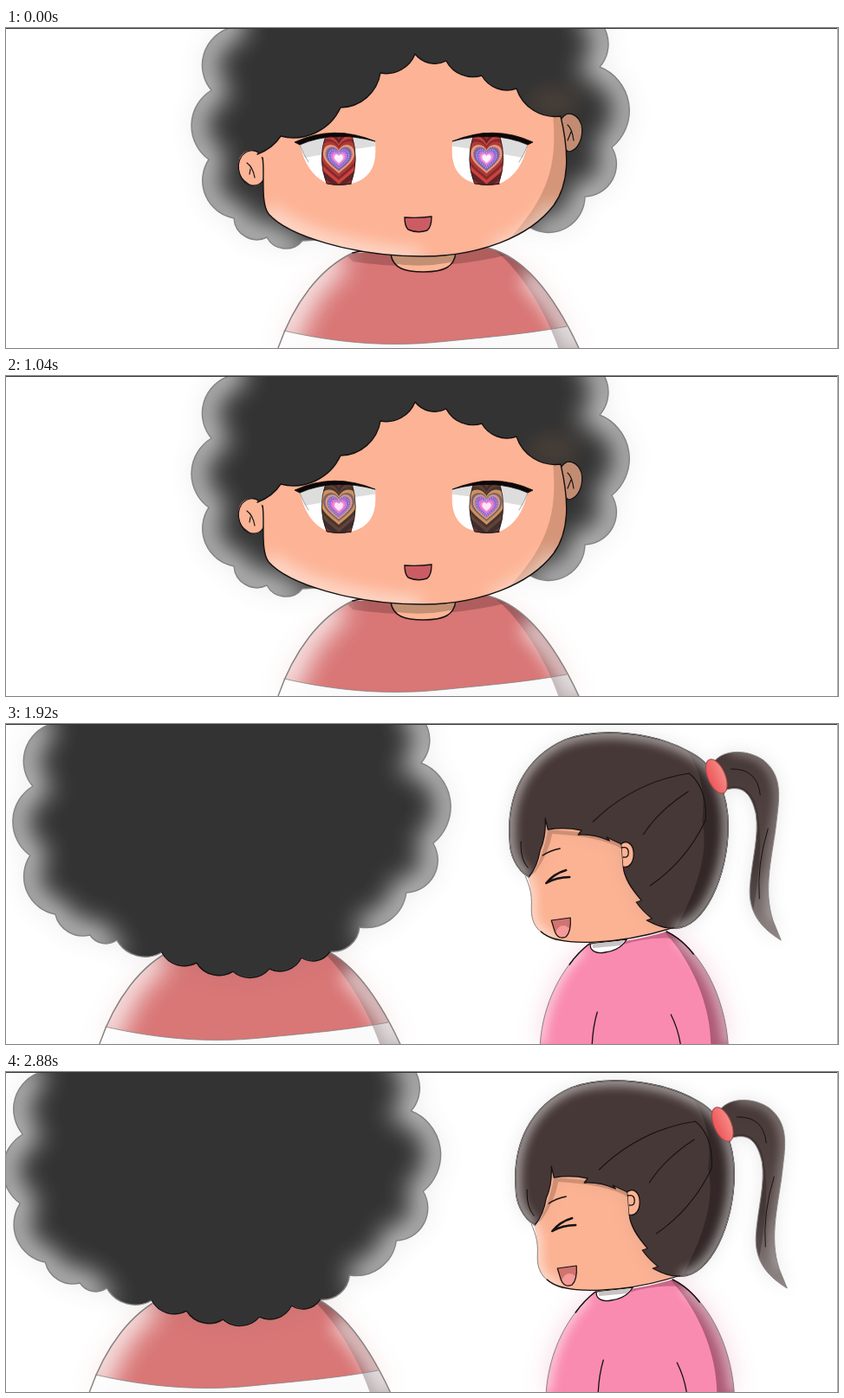
An HTML page for the animation above (2960 ms loop, 960 px wide and 370 px high).

```html
<!DOCTYPE html>
<html lang="en">
<head>
<meta charset="utf-8">
<title>Heart eyes</title>
<style>
html, body { margin: 0; width: 100%; height: 100%; overflow: hidden; background: #fff; }
svg { display: block; width: 100vw; height: 100vh; }
.line { fill: none; stroke: #161212; stroke-width: 1.5; stroke-linecap: round; stroke-linejoin: round; }
.grey { stroke: #858282; }
.b1 { filter: blur(.6px); }
.b6 { filter: blur(6px); }
.b10 { filter: blur(10px); }
.b15 { filter: blur(15px); }
</style>
</head>
<body>
<svg id="stage" viewBox="0 0 960 370" preserveAspectRatio="none"></svg>
<script>
const STEP = 80, LOOP = 2960, CUT = 1200;
const BOY_SPEED = -0.012, GIRL_SPEED = 0.0073;
const BACK_SHIFT = -197.5;

// Round lobes through a list of points.
function lobes(points, k = 0.56) {
  return points.slice(1).map(([x, y], i) => {
    const [px, py] = points[i];
    const r = (k * Math.hypot(x - px, y - py)).toFixed(1);
    return `A${r} ${r} 0 0 0 ${x} ${y}`;
  }).join('');
}

let clips = 0;
function clipped(d, content) {
  const id = 'clip' + clips++;
  return `<clipPath id="${id}"><path d="${d}"/></clipPath><g clip-path="url(#${id})">${content}</g>`;
}
const fill = (d, color, extra = '') => `<path d="${d}" fill="${color}" ${extra}/>`;
const line = (d, width = 1.5, cls = '') => `<path class="line ${cls}" d="${d}" style="stroke-width:${width}"/>`;
const glow = (d, width, cls, opacity = 1, color = '#fff') =>
  `<path class="${cls}" d="${d}" fill="none" stroke="${color}" stroke-width="${width}" opacity="${opacity}"/>`;

// Curly hair
const leftCurls = [[258, 0], [237, 72], [234, 152], [263, 220]];
const rightCurls = [[668, 195], [699, 138], [685, 45], [664, -20]];
const frontLeft = [...leftCurls, [301, 242], [342, 246]];
const frontRight = [[605, 231], ...rightCurls];
const nape = [[263, 220], [303, 244], [334, 250], [386, 264], [426, 276], [468, 286],
  [510, 283], [547, 270], [580, 263], [614, 235], [668, 195]];
const NAPE_ROUND = 0.7;

const leftEdge = 'M258 -60L258 0' + lobes(frontLeft, 0.6);
const rightEdge = 'M605 231' + lobes(frontRight, 0.58);
const frontHair = leftEdge + 'L605 231' + lobes(frontRight, 0.58) + 'L664 -60Z';
const backHair = 'M258 -60L258 0' + lobes(leftCurls, 0.6) + lobes(nape, NAPE_ROUND) + lobes(rightCurls, 0.58) + 'L664 -60Z';
const backLeft = 'M258 0' + lobes(leftCurls, 0.6) + lobes(nape.slice(0, 3), NAPE_ROUND);
const backRight = 'M614 235' + lobes(nape.slice(-2), NAPE_ROUND) + lobes(rightCurls, 0.58);
const napeMiddle = 'M386 264' + lobes(nape.slice(3, 9), NAPE_ROUND);

function curlyHair(shape, left, right) {
  return fill(shape, '#555', 'class="b15" opacity=".1"') +
    clipped(shape, fill(shape, '#333') + glow(left, 32, 'b15', .72) + glow(right, 32, 'b15', .72)) +
    line(shape, 1.4, 'grey');
}

// Boy's jersey
const leftShoulder = 'M400 260C362 278 332 318 314 370';
const rightShoulder = 'M555 254C600 264 634 312 661 370';
const jersey = leftShoulder + 'L661 370C634 312 600 264 555 254Z';
const hem = 'M321 350C380 364 440 369 500 363S600 354 647 345';
const yoke = hem + 'L640 250L310 240Z';
const sleeveShade = 'M560 254C590 275 622 325 638 372L670 372L610 260Z';

function boyBody() {
  return fill(jersey, '#d98080', 'class="b15" opacity=".16"') +
    clipped(jersey,
      fill(jersey, '#fafafa') + fill(yoke, '#d97676') +
      fill('M380 250H580V262Q490 284 400 270Z', '#5a2a2a', 'opacity=".32"') +
      fill(sleeveShade, '#5a3a3e', 'opacity=".42"') +
      glow('M385 262C350 285 332 318 314 370', 38, 'b15', .85) +
      glow('M600 285C625 310 640 330 661 370', 26, 'b10', .65)) +
    line(hem, .8, 'grey') +
    line(leftShoulder, 1.4, 'grey') +
    line(rightShoulder, 1.4, 'grey') +
    line('M440 257Q415 256 400 260', 1.4);
}

// Boy's face
const fringe = [[317, 125], [386, 92], [432, 52], [472, 30], [508, 38], [549, 55], [589, 70], [640, 102]];
const fringeEdge = 'M290 146Q308 139 317 125' + lobes(fringe, 0.78);
const jaw = 'C650 145 650 180 632 205C604 242 545 264 480 264C400 264 325 240 303 215C293 202 299 165 296 150';
const face = fringeEdge + jaw + 'Z';

const heart = 'M0-.55C-.25-1.05-1-1-1-.3C-1 .2-.4 .6 0 .95C.4 .6 1 .2 1-.3C1-1 .25-1.05 0-.55Z';
const iris = 'M369 124Q384 119 399 124Q408 152 398 180Q384 183 370 180Q359 152 369 124Z';
// size, starting colour, colour after 800 ms
const rings = [
  [46, [140, 46, 46], [112, 52, 46]],
  [38, [96, 36, 40], [62, 46, 46]],
  [31, [205, 66, 62], [96, 66, 56]],
  [26, [136, 42, 46], [72, 52, 48]],
  [22, [176, 58, 56], [206, 146, 90]],
  [18, [222, 160, 120], [124, 100, 104]],
  [15.5, [150, 90, 130], [205, 145, 130]],
  [13, [110, 108, 210], [130, 96, 200]],
  [10, [188, 104, 212], [196, 104, 212]],
  [7.5, [244, 146, 212], [242, 136, 200]],
  [5, [255, 240, 255], [255, 228, 250]]
];

const eyeWhite = 'M339 134Q380 116 426 131C429 160 420 174 399 180L371 180C353 172 343 155 339 134Z';
const eyeball = clipped(eyeWhite, fill(eyeWhite, '#fff') + fill('M330 110H430V136Q385 142 345 150Z', '#dedddd')) +
  line('M339 135Q343 146 349 155', .7, 'grey') +
  line('M372 180Q384 182 398 180', 1.3);
const lid = fill('M333 132Q378 111 426 131Q378 118 339 135Z', '#0c0808', 'stroke="#0c0808" stroke-width=".8"');

const hearts = rings.map(([r]) => `<path class="ring" d="${heart}" transform="scale(${r})"/>`).join('');
const dots = [15, 11.5, 8.5, 5].map((r, i) =>
  `<path d="${heart}" transform="scale(${r})" fill="none" stroke="${i % 2 ? '#fff' : '#e9c0e8'}" stroke-width="${1 / r}" stroke-dasharray="${1.3 / r}" opacity=".6"/>`).join('');
const irisArt = clipped(iris, fill(iris, '#6c2426') + `<g class="b1"><g transform="translate(384 151)">${hearts}${dots}</g></g>`) +
  line(iris, .7);

function boyFace() {
  return fill('M268 162C267 147 276 140 285 142C297 145 299 158 297 172C295 183 286 185 279 179C272 174 269 169 268 162Z', '#fbb496') +
    line('M296 150C293 141 280 138 272 148C264 160 270 179 283 182Q292 183 297 176M278 156Q285 161 287 173M282 163L281 169', 1.2) +
    fill('M641 105C648 94 660 100 664 112C667 127 660 141 650 143L641 135Z', '#c28c73') +
    line('M641 105C648 94 660 100 664 112C667 127 660 141 650 143Q644 143 641 137M648 112Q653 116 655 130M652 120L648 130', 1.2) +
    clipped(face,
      fill(face, '#fdb395') +
      fill('M630 90C638 160 628 198 562 264L660 264V90Z', '#8f6046', 'opacity=".36"') +
      glow('M300 212C325 240 405 264 480 268', 22, 'b10', .55) +
      glow('M560 262Q610 240 636 206', 22, 'b10', .5)) +
    line(fringeEdge + jaw, 1.4) +
    eyeball + `<g transform="translate(941 0) scale(-1 1)">${eyeball}</g>` +
    irisArt + `<g transform="translate(170.5 0)">${irisArt}</g>` +
    lid + `<g transform="translate(941 0) scale(-1 1)">${lid}</g>` +
    fill('M460 219Q476 220 491 218Q491 230 486 234Q475 238 464 233Q460 229 460 219Z', '#cb5c64', 'stroke="#161212" stroke-width="1.4"');
}

function neck() {
  const d = 'M444 262C447 278 460 282 482 282C506 282 517 276 519 260Z';
  return clipped(d, fill(d, '#fdb596') + fill('M440 255H525V268Q485 279 444 272Z', '#c39074')) + line(d);
}

const frontScene = curlyHair(frontHair, leftEdge, rightEdge) +
  '<ellipse class="b10" cx="632" cy="85" rx="30" ry="18" fill="#6a5140" opacity=".35"/>' +
  boyBody() + neck() + boyFace();
const boyBack = boyBody() + curlyHair(backHair, backLeft, backRight) + line(napeMiddle, 1.5);

// Girl
const pinkTop = 'M668 254C635 280 614 325 611 370L828 370C824 315 797 260 757 240Q710 254 668 254Z';
const girlSkin = 'M594 165C598 185 602 190 601 212C600 234 612 244 630 250C665 258 725 248 766 235L740 120L620 112Z';
const girlHair = 'M598 177C583 168 576 150 576 135C572 85 592 39 640 18C682 3 745 10 785 33' +
  'C817 50 828 85 828 118C828 176 800 237 766 236C753 237 742 231 734 227L740 225Q728 215 722 206L728 204' +
  'C716 190 708 178 707 165L705 139L688 131L691 135Q674 127 655 128L659 123Q640 119 620 122L617 109Q618 130 611 146Q608 165 598 177Z';
const hairRim = 'M598 177C583 168 576 150 576 135C572 85 592 39 640 18C682 3 745 10 785 33C817 50 828 85 828 118C828 176 800 237 766 236';
const ponytail = 'M812 43C825 28 852 30 869 42C891 60 887 85 884 110C880 150 867 190 880 228L889 250' +
  'C861 233 852 214 853 190C855 158 864 130 860 104C855 82 846 70 826 76Z';

const girl =
  fill(pinkTop, '#e87898', 'class="b15" opacity=".3"') +
  clipped(pinkTop,
    fill(pinkTop, '#fa8bb0') +
    fill('M750 236C783 268 808 322 808 372L840 372L800 250Z', '#743448', 'opacity=".55"') +
    fill('M705 250L757 238L768 248Q735 245 700 257Z', '#a94d6c', 'opacity=".55"') +
    glow('M660 260C635 280 614 325 611 370', 12, 'b6', .55) +
    glow('M770 248C800 270 824 315 828 370', 14, 'b6', .45)) +
  line('M668 254C635 280 614 325 611 370M757 240C797 260 824 315 828 370', 1, 'grey') +
  line('M668 254Q655 264 645 278M757 240Q775 249 788 266') +
  line('M677 333Q672 350 671 370M762 336Q770 352 773 370', 1.3) +
  fill('M669 254C668 263 677 266 686 264Q703 262 711 249Z', '#fff', 'stroke="#161212" stroke-width="1.3"') +
  fill('M671 254L709 250L704 256Q685 258 672 259Z', '#c9c3c3') +
  clipped(girlSkin,
    fill(girlSkin, '#fcb394') +
    fill('M597 178Q612 165 620 122L655 125L691 132L705 140V144Q680 130 625 127Q621 150 605 172Z', '#bb7d63', 'opacity=".6"') +
    glow('M594 165C598 185 602 190 601 212C600 234 612 244 630 250', 9, 'b6', .65)) +
  line('M594 176C598 186 602 194 601 212C600 234 612 244 630 250', 1, 'grey') +
  line('M612 240C632 259 705 255 766 235', 1.3) +
  fill(ponytail, '#6a5a58', 'class="b10" opacity=".15"') +
  clipped(ponytail, fill(ponytail, 'url(#tail)') +
    fill('M826 74Q848 66 859 90Q872 130 857 215L850 190L862 120Z', '#2c2222', 'opacity=".4"') +
    glow('M830 31C872 30 894 60 884 110C880 150 867 190 880 228', 6, 'b6', .55)) +
  line(ponytail, 1, 'grey') +
  line('M831 52Q862 51 865 82M874 121Q861 163 864 202', 1) +
  fill(girlHair, '#655', 'class="b10" opacity=".14"') +
  clipped(girlHair, fill(girlHair, '#463836') +
    fill('M780 30C796 54 802 78 798 112C806 150 792 192 766 240L840 240V40Z', '#211919', 'opacity=".5"') +
    glow(hairRim, 12, 'b6', .55)) +
  line(girlHair, 1.3) + line(hairRim, 1.1, 'grey') +
  line('M672 113Q719 67 783 57M730 128Q748 100 782 78M738 187Q780 158 802 111M589 136Q588 156 597 166M783 57Q804 74 802 111', 1.1) +
  fill('M705 139C711 133 719 139 719 150C719 160 714 167 707 165Z', '#fcb394') +
  line('M704 139C711 133 719 139 719 150C719 160 714 167 707 165M705 143Q713 141 713 149Q713 155 707 154', 1.3) +
  '<ellipse cx="814.5" cy="60.5" rx="10" ry="21" transform="rotate(-23 814.5 60.5)" fill="url(#band)" stroke="#a34749"/>' +
  line('M614 152Q623 146 634 144', 1.4) +
  line('M641 169Q627 173 618 184Q630 177 645 177', 2.4) +
  clipped('M624 227L646 224Q647 240 641 246Q632 250 628 240Z',
    fill('M620 220H650V250H620Z', '#d07470') + '<ellipse cx="638" cy="243" rx="9" ry="10" fill="#f59a98"/>') +
  line('M624 227L646 224Q647 240 641 246Q632 250 628 240Z', 1.2);

const stage = document.getElementById('stage');
stage.innerHTML = `
  <defs>
    <linearGradient id="tail" x2="0" y2="1">
      <stop offset="0" stop-color="#463836"/><stop offset=".6" stop-color="#574947"/><stop offset="1" stop-color="#918888"/>
    </linearGradient>
    <linearGradient id="band"><stop stop-color="#ee5559"/><stop offset="1" stop-color="#f58b85"/></linearGradient>
  </defs>
  <rect width="960" height="370" fill="#fff"/>
  <g id="front">${frontScene}</g>
  <g id="back"><g id="boy">${boyBack}</g><g id="girl">${girl}</g></g>
  <path d="M0 .5H960" stroke="#333"/><path d="M959.5 0V370" stroke="#aaa"/>`;

const [front, back, boy, girlGroup] = ['front', 'back', 'boy', 'girl'].map(id => document.getElementById(id));
const ringPaths = [...document.querySelectorAll('.ring')];

function draw(time) {
  const t = Math.floor((time % LOOP) / STEP) * STEP;
  const facing = t < CUT;
  front.style.display = facing ? '' : 'none';
  back.style.display = facing ? 'none' : '';
  if (facing) {
    const p = Math.min(1, t / 800);
    ringPaths.forEach((path, i) => {
      const [, from, to] = rings[i % rings.length];
      path.setAttribute('fill', `rgb(${from.map((v, c) => Math.round(v + (to[c] - v) * p))})`);
    });
  } else {
    const moved = t - CUT;
    boy.setAttribute('transform', `translate(${BACK_SHIFT + BOY_SPEED * moved} 0)`);
    girlGroup.setAttribute('transform', `translate(${GIRL_SPEED * moved} 0)`);
  }
}

const start = performance.now();
function tick() {
  draw(performance.now() - start);
  requestAnimationFrame(tick);
}
tick();
</script>
</body>
</html>
```
